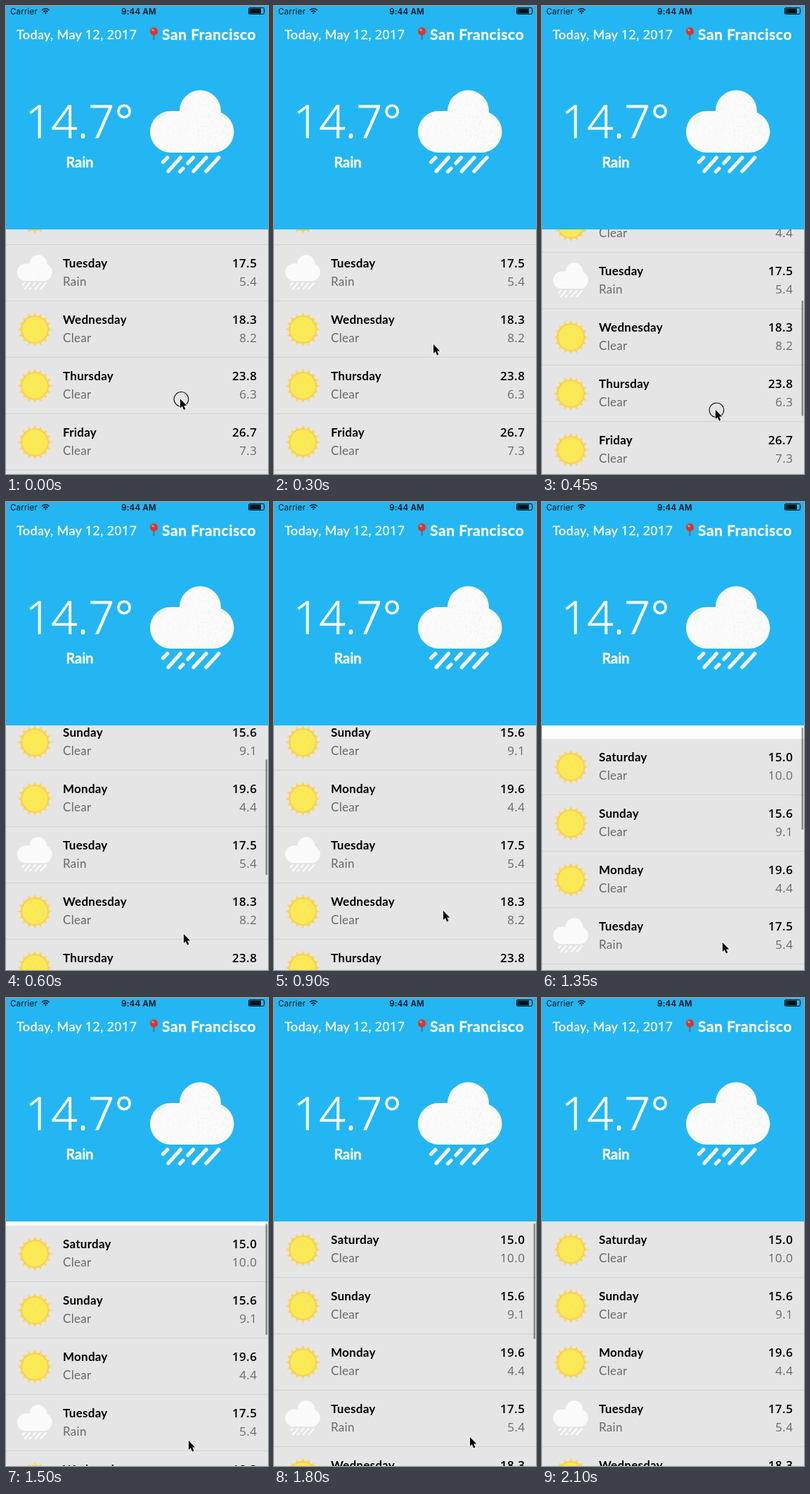
Recreate the animation shown at these times as an HTML page. Size 373 by 664 pixels, loop 2.4 s.

```html
<!DOCTYPE html>
<html lang="en">
<head>
<meta charset="utf-8">
<title>Weather forecast</title>
<style>
  html, body { margin: 0; width: 100%; height: 100%; overflow: hidden; background: #fff; }
  svg { display: block; width: 100%; height: 100%; }
  text { font-family: Lato, "Open Sans", sans-serif; white-space: pre; }
  .num { font-family: "Open Sans", "Noto Sans", sans-serif; }
  .status { font-family: Inter, Roboto, sans-serif; font-size: 11.5px; fill: #061219; }
  .day { font-size: 17px; font-weight: 700; letter-spacing: .25px; }
  .day .num { font-weight: 600; }
  .cond { font-size: 17px; letter-spacing: .3px; fill: #696969; }
  .end { text-anchor: end; letter-spacing: .4px; }
  .head { fill: #fff; stroke: #fff; stroke-width: .4; }
</style>
</head>
<body>
<svg viewBox="0 0 373 664">
  <defs>
    <path id="cloudShape" d="M29.500 30H90A29.500 29.500 0 0 1 90 89H29.500A29.500 29.500 0 0 1 29.500 30ZM42 30A29.500 29.500 0 0 1 101 30A29.500 29.500 0 0 1 42 30Z"/>
    <clipPath id="cloudClip"><use href="#cloudShape"/></clipPath>
    <g id="cloud">
      <use href="#cloudShape" fill="#fbfbfb"/>
      <path id="cloudGrain" clip-path="url(#cloudClip)" stroke="#f0f0f0" stroke-width="1.3"/>
      <path d="M18.500 102.500L25 96M26 115.500L43.500 96M42.500 116L47 111.500M54 104L61.500 96M62 115.500L80 96M80 115.500L98 96"
            stroke="#fbfbfb" stroke-width="5.200" stroke-linecap="round"/>
    </g>
    <g id="sun">
      <path id="rays" fill="#fbd566"/>
      <circle r="20" fill="#fbd153"/>
      <circle r="17.800" fill="#fbea57"/>
      <path id="sunGrain" stroke="#f8e251"/>
    </g>
  </defs>

  <g id="list"><rect width="373" height="720" fill="#e5e5e5"/></g>
  <rect id="bar" x="369.500" width="2.600" rx="1.300" fill="#000" fill-opacity=".4"/>

  <rect width="373" height="317" fill="#23b6f3"/>
  <text class="status" x="6" y="11.500" letter-spacing=".2">Carrier</text>
  <g fill="none" stroke="#061219" stroke-width="1.700">
    <path d="M50.800 6A7.600 7.600 0 0 1 61.600 6M53 8.400A4.700 4.700 0 0 1 59.400 8.400"/>
    <path d="M54.500 9.900A2.500 2.500 0 0 1 57.900 9.900L56.200 11.700Z" fill="#061219" stroke="none"/>
  </g>
  <text class="status" x="189" y="11.500" text-anchor="middle" font-weight="600" letter-spacing=".2">9:44 AM</text>
  <rect x="345.500" y="2.500" width="22" height="9" rx="1.500" fill="none" stroke="#061219"/>
  <path d="M346.500 3.500H363V10.500H346.500ZM368.500 5.200Q370.200 7 368.500 8.800Z" fill="#061219"/>

  <g class="head" id="head"></g>
  <path d="M210.500 40V47.500" stroke="#6c6470" stroke-width="2" stroke-linecap="round"/>
  <circle cx="210.500" cy="36" r="5.700" fill="#d23b2c"/>
  <ellipse cx="209" cy="34" rx="2" ry="1.600" fill="#ee8d7c"/>
  <use href="#cloud" x="205" y="119"/>

  <g id="cursor">
    <circle id="press" cx="1.500" cy=".3" r="10.300" fill="none" stroke="#111" stroke-width="1.100"/>
    <path d="M0 0V13L2.900 10.300L5.100 15.600L7.500 14.600L5.300 9.400H9.300Z" fill="#000" stroke="#fff" stroke-width="1.400" paint-order="stroke"/>
  </g>
</svg>
<script>
const $ = id => document.getElementById(id);

// Digits get their own typeface, with a plain "1".
const label = (s, x, y, cls, attrs = '') =>
  `<text x="${x}" y="${y}" class="${cls}" ${attrs}>${s.replace(/[\d.]+/g, '<tspan class="num">$&</tspan>')}</text>`;

let seed = 7;
const rnd = () => (seed = seed * 16807 % 2147483647) / 2147483647;
const grain = (n, point) =>
  Array.from({ length: n }, () => 'M' + point().map(v => v.toFixed(1)) + 'h1.2').join('');

$('cloudGrain').setAttribute('d', grain(420, () => [rnd() * 120, rnd() * 90]));
$('sunGrain').setAttribute('d', grain(70, () => {
  const a = rnd() * 2 * Math.PI, r = 16 * Math.sqrt(rnd());
  return [r * Math.cos(a), r * Math.sin(a)];
}));
$('rays').setAttribute('d', 'M' + Array.from({ length: 32 }, (_, i) => {
  const a = i * Math.PI / 16, r = i % 2 ? 18 : 24.5;
  return [r * Math.sin(a), -r * Math.cos(a)].map(v => v.toFixed(2));
}).join('L') + 'Z');

$('head').innerHTML =
  label('Today, May 12, 2017', 15, 47, '', 'font-size="18" letter-spacing=".4"') +
  label('San Francisco', 222, 48, '', 'font-size="21" font-weight="700" letter-spacing=".55"') +
  label('14.7°', 27.5, 186.5, 'num', 'font-size="65" font-weight="300" stroke-width=".9"') +
  label('Rain', 105, 229, '', 'font-size="20" font-weight="700" text-anchor="middle"');

const days = [
  ['Saturday', 'Clear', '15.0', '10.0'],
  ['Sunday', 'Clear', '15.6', '9.1'],
  ['Monday', 'Clear', '19.6', '4.4'],
  ['Tuesday', 'Rain', '17.5', '5.4'],
  ['Wednesday', 'Clear', '18.3', '8.2'],
  ['Thursday', 'Clear', '23.8', '6.3'],
  ['Friday', 'Clear', '26.7', '7.3']
];
$('list').innerHTML += days.map(([day, cond, high, low], i) => `<g transform="translate(0 ${i * 80})">
  <use href="#${cond === 'Rain' ? 'cloud' : 'sun'}" transform="${
    cond === 'Rain' ? 'translate(16 14) scale(.417)' : 'translate(41 40)'}"/>
  ${label(day, 81, 32.3, 'day')}${label(cond, 81, 58, 'cond')}
  ${label(high, 357.3, 32.3, 'day end')}${label(low, 357.3, 58, 'cond end')}
  <rect y="79" width="373" height="1" fill="#d2d2d2"/></g>`).join('');

// One pose per 150 ms: pointer x, y, pressed, scroll offset, scrollbar opacity.
const STEP = 150, LOOP = 2400;
const poses = [
  [248, 557.5, 1, 218, 0],
  [237, 513, 0, 218, 0],
  [227, 480, 0, 218, 0],
  [247, 573, 1, 207, 1],
  [253, 613, 0, 96, 1],
  [250, 597, 0, 96, .5],
  [241, 580, 0, 96, 0],
  [221, 511, 0, 96, 0],
  [229, 531, 1, 96, 0],
  [257, 625, 0, -19, 1],
  [260, 628, 0, -6, 1],
  [270, 626, 0, -2, 1],
  [279, 623, 0, 0, 1],
  [null, 0, 0, 0, .5],
  [null, 0, 0, 0, 0]
];

function draw(now) {
  const step = Math.floor(now % LOOP / STEP);
  const [x, y, pressed, scroll, opacity] = poses[Math.min(step, poses.length - 1)];
  $('list').setAttribute('transform', `translate(0 ${317 - scroll})`);
  $('bar').setAttribute('y', 320 + .472 * Math.max(0, scroll));
  $('bar').setAttribute('height', 164 + Math.min(0, scroll));
  $('bar').setAttribute('opacity', opacity);
  $('cursor').setAttribute('visibility', x === null ? 'hidden' : 'visible');
  $('cursor').setAttribute('transform', `translate(${x || 0} ${y})`);
  $('press').setAttribute('opacity', pressed);
}

function tick(now) {
  draw(now);
  requestAnimationFrame(tick);
}
draw(0);
requestAnimationFrame(tick);
</script>
</body>
</html>
```
